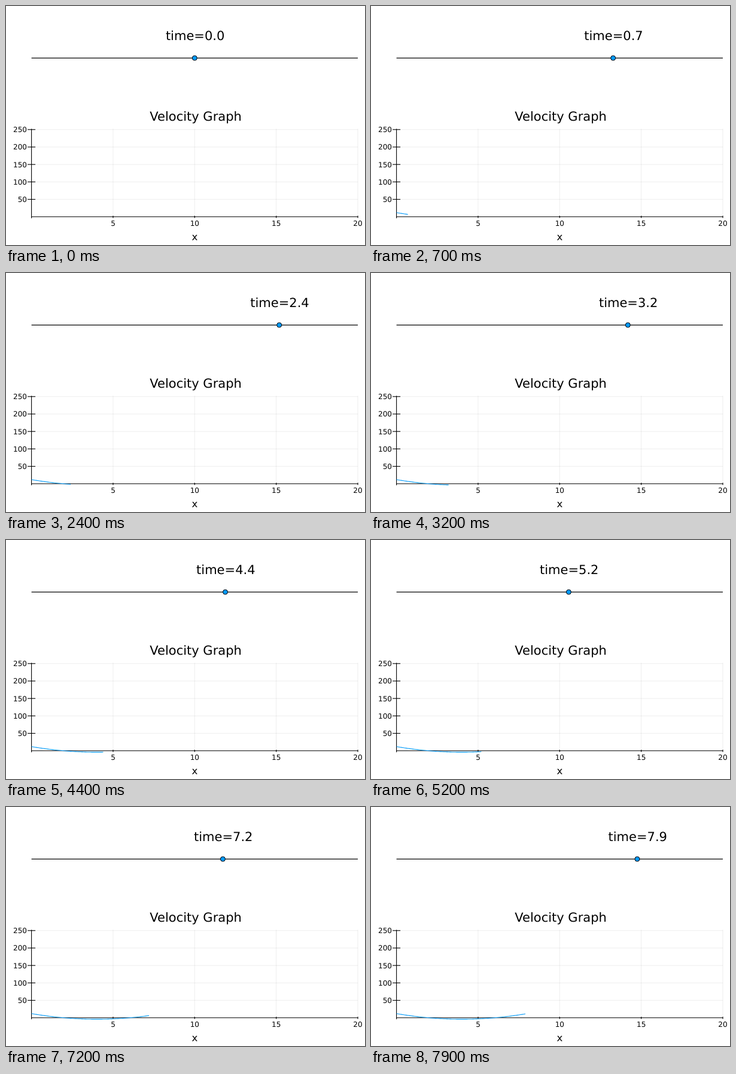
Write an HTML page that moves like this. It is 600 by 400 pixels and loops after 8000 ms.

```html
<!DOCTYPE html>
<html lang="en">
<head>
<meta charset="utf-8">
<title>Velocity Graph</title>
<style>
html, body { margin: 0; width: 100%; height: 100%; overflow: hidden; background: #fff; }
svg { display: block; width: 600px; height: 400px; }
text { font-family: "DejaVu Sans", sans-serif; text-rendering: geometricPrecision; }
.title { font-size: 21px; }
.label { font-size: 16.5px; text-anchor: middle; }
.tick { font-size: 12px; }
.axis { stroke: #000; stroke-width: 1.1; }
.grid { stroke: #000; stroke-opacity: .07; }
#curve { fill: none; stroke: #009afa; stroke-width: 1.1; stroke-linejoin: round; }
#ball { fill: #009afa; stroke: #000; }
</style>
</head>
<body>
<svg viewBox="0 0 600 400">
  <g id="plot"></g>
  <path id="curve"/>
  <line class="axis" x1="42.6" x2="588" y1="87.1" y2="87.1"/>
  <circle id="ball" cy="87.1" r="4"/>
  <text id="time" class="title" y="57"></text>
  <text class="title" x="240.3" y="192">Velocity Graph</text>
  <text class="label" x="315.4" y="391.5">x</text>
</svg>
<script>
const LEFT = 42.6, RIGHT = 588, TOP = 205.5, BOTTOM = 355.2;
const DURATION = 8000, STEP = 100;
const $ = id => document.getElementById(id);

const plotX = t => LEFT + t * (RIGHT - LEFT) / 20;
const plotY = v => 352.8 - v * 0.584;
const velocity = t => t * t - 8 * t + 12;
const position = t => t ** 3 / 3 - 4 * t * t + 12 * t;
const trackX = t => 315.3 + position(t) * (RIGHT - LEFT) / 40;

function add(tag, attrs, text = "") {
  const el = document.createElementNS("http://www.w3.org/2000/svg", tag);
  for (const key in attrs) el.setAttribute(key, attrs[key]);
  el.textContent = text;
  $("plot").append(el);
}
const line = (cls, x1, y1, x2, y2) => add("line", { class: cls, x1, y1, x2, y2 });

function drawPlot() {
  const xs = [5, 10, 15, 20], ys = [50, 100, 150, 200, 250], base = plotY(0);
  xs.forEach(n => line("grid", plotX(n), TOP, plotX(n), BOTTOM));
  ys.forEach(n => line("grid", LEFT, plotY(n), RIGHT, plotY(n)));
  line("axis", LEFT, base, RIGHT, base);
  line("axis", LEFT, TOP, LEFT, BOTTOM);
  for (const n of xs) {
    const x = plotX(n);
    line("axis", x, base - 1.9, x, base + 1.9);
    add("text", { class: "tick", x, y: 368.4, "text-anchor": "middle" }, n);
  }
  for (const n of ys) {
    const y = plotY(n);
    line("axis", LEFT - 6.5, y, LEFT + 6.5, y);
    add("text", { class: "tick", x: 35, y: y + 4.4, "text-anchor": "end" }, n);
  }
}

function draw(now) {
  const step = Math.floor(now % DURATION / STEP);
  const t = step / 10, x = trackX(t);
  let path = "";
  for (let i = 0; i <= step; i++) {
    path += `${i ? "L" : "M"}${plotX(i / 10).toFixed(2)} ${plotY(velocity(i / 10)).toFixed(2)}`;
  }
  $("curve").setAttribute("d", path);
  $("ball").setAttribute("cx", x);
  $("time").setAttribute("x", x - 48.4);
  $("time").textContent = "time=" + t.toFixed(1);
}

drawPlot();
const start = performance.now();
function frame() {
  draw(performance.now() - start);
  requestAnimationFrame(frame);
}
frame();
</script>
</body>
</html>
```
